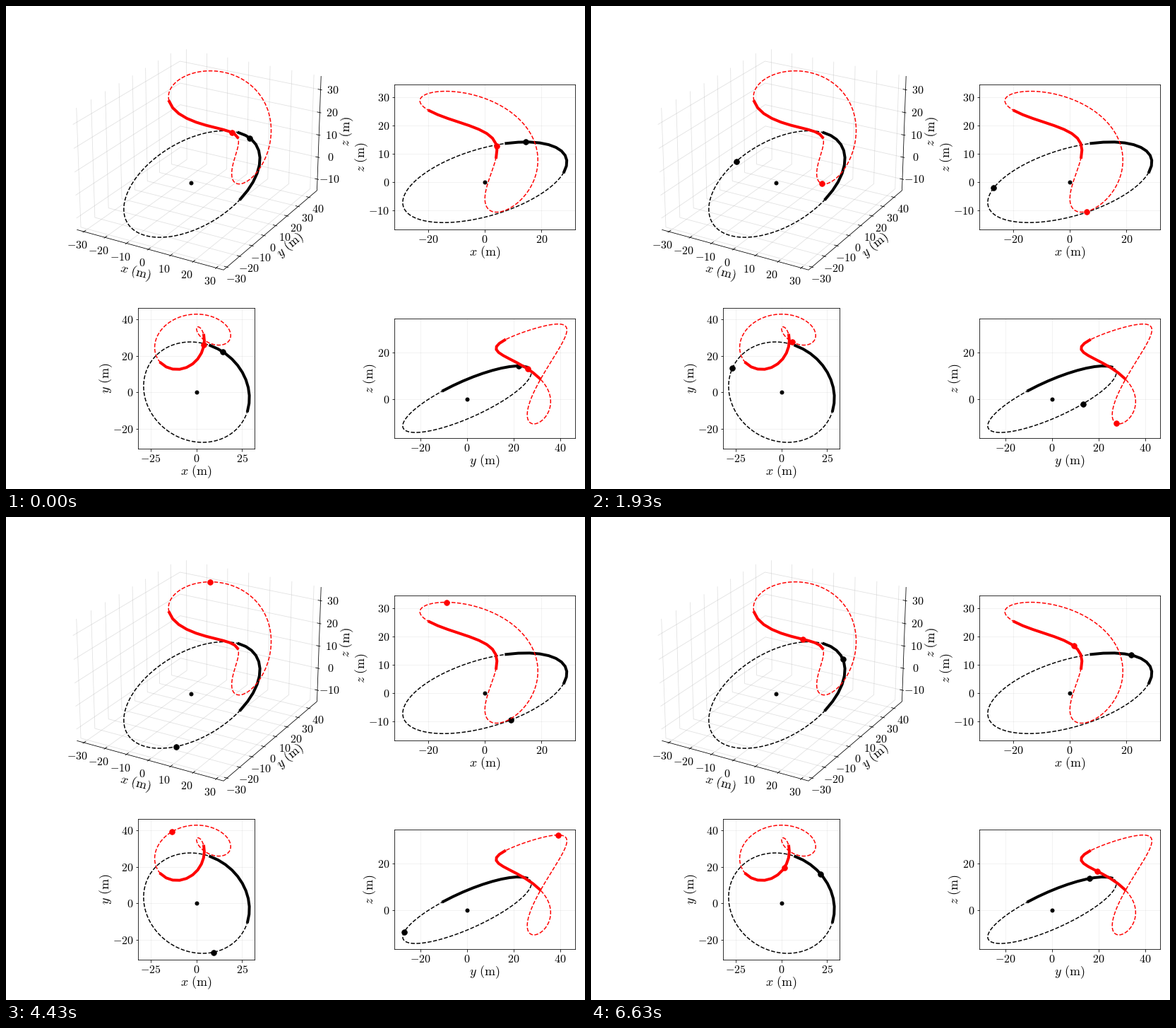
A matplotlib script for the animation above (6.66 s loop, 820x683 px).

```python
import numpy as np
import matplotlib.pyplot as plt
from matplotlib.animation import FuncAnimation

W, H, DPI = 820, 683, 72
FRAMES, LOOP = 200, 6660
STEP = 0.03  # orbit angle per frame, rad

plt.rcParams.update({
    "mathtext.fontset": "cm",
    "axes.linewidth": 0.8,
    "xtick.labelsize": 16,
    "ytick.labelsize": 16,
})

# Orbit plane: two in-plane axes and the normal
TILT, RADIUS = 0.4733, 30
COS_TILT = np.sqrt(1 - TILT**2)
E1 = np.array([0.5494 * COS_TILT, 0.8355 * COS_TILT, TILT])
E2 = np.array([-0.8355, 0.5494, 0.0])
NORMAL = np.cross(E1, E2)


def in_plane(w, h):
    return np.outer(E1, w.real) + np.outer(E2, w.imag) + np.outer(NORMAL, h)


def circle(theta):
    theta = np.atleast_1d(theta)
    return in_plane(RADIUS * np.exp(1j * theta), 0 * theta)


def relative(theta):
    """Tilted 2:1 ellipse seen in the rotating frame of the circle."""
    theta = np.atleast_1d(theta)
    spin, p = np.exp(1j * theta), 9.08 - 5.44j
    return in_plane(3 * np.conj(p) - 9.06 * spin + p * spin**2,
                    -21.7 * np.sin(theta))


# Perspective camera
AZIM, ELEV = np.radians(-60), np.radians(24)
RIGHT = np.array([-np.sin(AZIM), np.cos(AZIM), 0])
EYE = np.array([np.cos(ELEV) * np.cos(AZIM),
                np.cos(ELEV) * np.sin(AZIM), np.sin(ELEV)])
UP = np.cross(EYE, RIGHT)
PIVOT = np.array([0, 7.5, 9.0])
DIST, FOCAL = 588, 2079


def project(points):
    q = np.asarray(points, float).reshape(3, -1) - PIVOT[:, None]
    scale = FOCAL / (DIST - EYE @ q)
    return 275.3 + scale * (RIGHT @ q), 211 - scale * (UP @ q)


def flat(i, j):
    return lambda points: (points[i], points[j])


def draw_scene(ax, view):
    full = np.linspace(0, 2 * np.pi, 400)
    arc = np.radians(np.linspace(-75, 15, 11))
    dots = []
    ax.plot(*view(np.zeros((3, 1))), "o", color="black", ms=5, zorder=3)
    for path, color, z in ((circle, "black", 3), (relative, "red", 4)):
        ax.plot(*view(path(full)), "--", color=color, lw=1.5, zorder=z)
        ax.plot(*view(path(arc)), color=color, lw=4, zorder=z)
        dot, = ax.plot(*view(path(0)), "o", color=color, ms=7.5, zorder=z)
        dots.append((dot, view, path))
    return dots


def label(name, x, y, angle=0):
    stage.text(x, y, rf"${name}\ \mathrm{{(m)}}$", fontsize=18,
               ha="center", va="center", rotation=angle)


def panel(center, size, i, j, xticks, yticks):
    (cx, cy), (w, h) = center, size
    ax = fig.add_axes([(cx - w / 2) / W, 1 - (cy + h / 2) / H, w / W, h / H])
    dots = draw_scene(ax, flat(i, j))
    ax.set_xticks(xticks, [f"${t}$" for t in xticks])
    ax.set_yticks(yticks, [f"${t}$" for t in yticks])
    ax.set_axisbelow(True)
    ax.grid(color="#b0b0b0", alpha=0.2, lw=0.8)
    return dots


LO = np.array([-33.2, -32.6, -15.2])
HI = np.array([33.2, 47.6, 35.8])


def draw_box():
    (x0, y0, z0), (x1, y1, z1) = LO, HI
    ink = dict(color="black", lw=0.8, zorder=2)

    def line(points, **style):
        stage.plot(*project(np.array(points, float).T), **style)

    def tick(value, edge, direction, size, shift):
        edge, step = np.array(edge, float), np.zeros(3)
        step[direction] = size
        line([edge + step, edge - 2 * step], **ink)
        px, py = project(edge)
        stage.text(px[0] + shift[0], py[0] + shift[1], f"${value}$",
                   fontsize=16, ha="center", va="center")

    def grid(points):
        line(points, color="#b0b0b0", alpha=0.38, lw=0.8, zorder=1)

    for t in range(-30, 31, 10):
        grid([(t, y0, z0), (t, y1, z0), (t, y1, z1)])
        tick(t, (t, y0, z0), 1, -0.67, (-9, 19.5))
    for t in range(-30, 41, 10):
        grid([(x1, t, z0), (x0, t, z0), (x0, t, z1)])
        tick(t, (x1, t, z0), 0, 0.55, (12.7, 17.5))
    for t in range(-10, 31, 10):
        grid([(x0, y0, t), (x0, y1, t), (x1, y1, t)])
        tick(t, (x1, y1, t), 0, 0.55, (17.3, 1))
    line([(x0, y0, z0), (x1, y0, z0), (x1, y1, z0), (x1, y1, z1)], **ink)


fig = plt.figure(figsize=(W / DPI, H / DPI), dpi=DPI, facecolor="white")
stage = fig.add_axes([0, 0, 1, 1])
stage.set(xlim=(0, W), ylim=(H, 0))
stage.axis("off")

draw_box()
markers = draw_scene(stage, project)
markers += panel((678.1, 213.4), (255.7, 204.3), 0, 2,
                 [-20, 0, 20], [-10, 0, 10, 20, 30])
markers += panel((269.8, 526.4), (164.8, 199.4), 0, 1,
                 [-25, 0, 25], [-20, 0, 20, 40])
markers += panel((678.1, 526.4), (255.7, 168.7), 1, 2,
                 [-20, 0, 20, 40], [0, 20])

label("x", 183.5, 376.5, -14.5)
label("y", 402.5, 338.5, 40)
label("z", 482.5, 177.5, 88)
label("x", 678, 348.2)
label("z", 503.5, 213.4, 90)
label("x", 269.5, 658.5)
label("y", 142, 526.4, 90)
label("y", 677.5, 643.2)
label("z", 515.5, 526.4, 90)


def update(k):
    for dot, view, path in markers:
        dot.set_data(*view(path(STEP * k)))
    return [m[0] for m in markers]


anim = FuncAnimation(fig, update, frames=FRAMES, interval=LOOP / FRAMES,
                     repeat=True, repeat_delay=0, blit=False)
plt.show()
```
